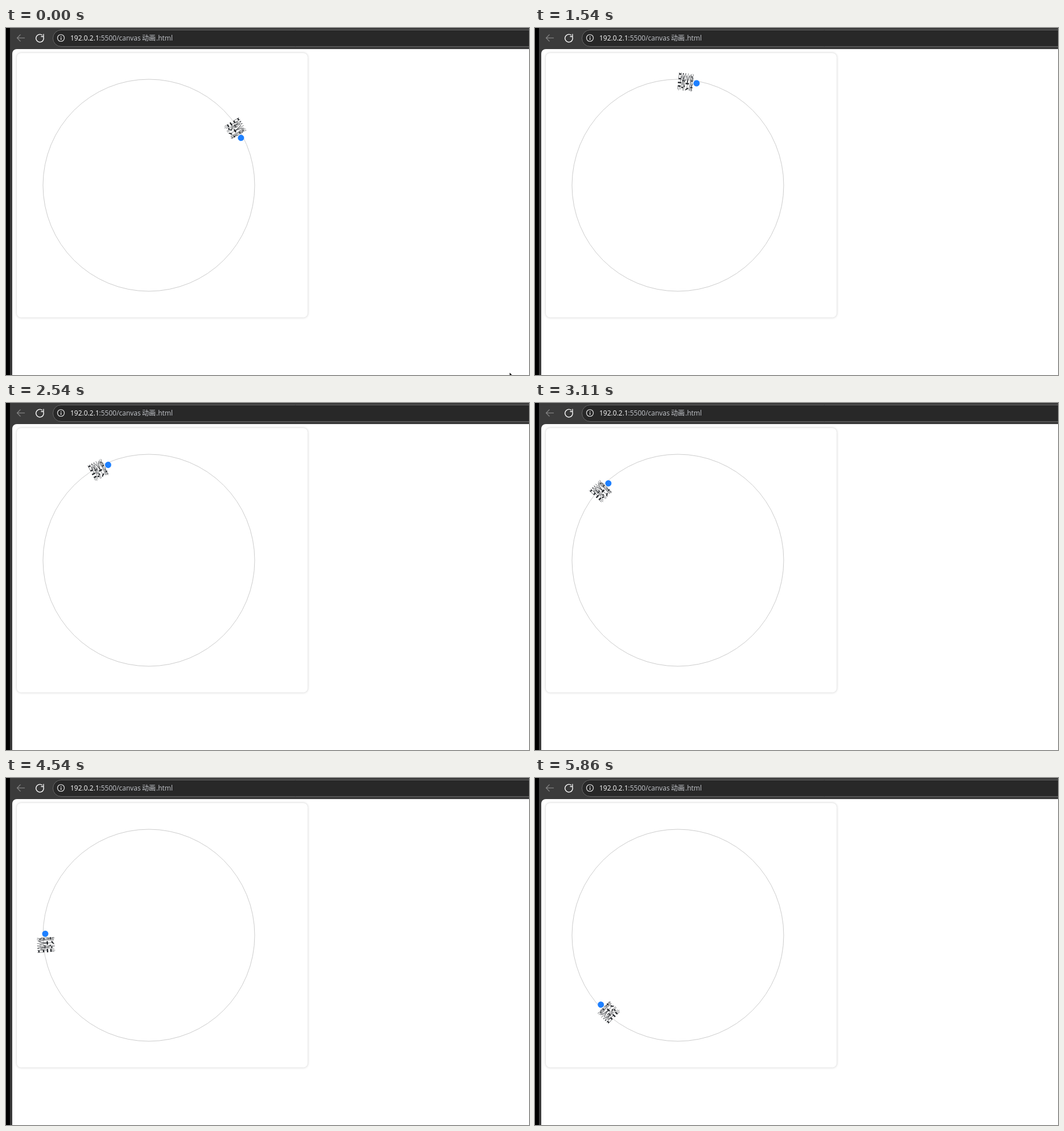
These frames come from a looping animation (919 by 609 pixels, 5.92 s). An HTML page with a canvas:

```html
<!DOCTYPE html>
<html lang="zh">
<head>
<meta charset="utf-8">
<title>Canvas orbit</title>
<style>
  html, body { margin: 0; width: 100%; height: 100%; overflow: hidden; background: #fff; }
  canvas { display: block; width: 919px; height: 609px; }
</style>
</head>
<body>
<canvas id="stage" width="919" height="609"></canvas>
<script>
const ctx = document.getElementById('stage').getContext('2d');
const LOOP = 5920;
const ORBIT = { x: 251, y: 276, r: 186 };
const UI_FONT = '12px "Open Sans", "Noto Sans", "Noto Sans CJK SC", sans-serif';
const LOGO_FONT = '500 34px "Noto Sans CJK SC", "Noto Sans CJK", sans-serif';
const LOGO_SQUASH = 0.2;

// Start of each stretch and the number of equal holds in it.
const BEATS = [
  [0, 1], [70, 8], [700, 2], [860, 1], [940, 5], [1320, 3], [1540, 1], [1630, 4],
  [1930, 8], [2540, 8], [3110, 1], [3160, 9], [3790, 9], [4400, 9], [5030, 9],
  [5650, 3], [5860, 1], [LOOP, 0]
];

function heldTime(t) {
  const i = BEATS.findIndex(([start]) => start > t) - 1;
  const [start, count] = BEATS[i];
  const step = (BEATS[i + 1][0] - start) / count;
  return start + Math.floor((t - start) / step) * step;
}

function roundRect(x, y, w, h, r) {
  ctx.beginPath();
  ctx.roundRect(x, y, w, h, r);
}

function circle(x, y, r) {
  ctx.beginPath();
  ctx.arc(x, y, r, 0, Math.PI * 2);
}

function line(points, color, width) {
  ctx.beginPath();
  points.forEach(([x, y]) => ctx.lineTo(x, y));
  ctx.strokeStyle = color;
  ctx.lineWidth = width;
  ctx.stroke();
}

function label(text, x, y, color) {
  ctx.fillStyle = color;
  ctx.fillText(text, x, y);
}

function drawToolbar() {
  ctx.fillStyle = '#3b3b3b';
  ctx.fillRect(0, 0, 919, 609);
  ctx.fillStyle = '#000';
  ctx.fillRect(0, 0, 7, 609);

  roundRect(82.5, 3.5, 860, 29, 14.5);
  ctx.fillStyle = '#282828';
  ctx.fill();
  ctx.strokeStyle = '#686868';
  ctx.lineWidth = 1;
  ctx.stroke();

  line([[33, 17.5], [19.5, 17.5]], '#858585', 1.2);
  line([[25.5, 11.5], [19.5, 17.5], [25.5, 23.5]], '#858585', 1.2);

  ctx.beginPath();
  ctx.arc(59.5, 18, 6.8, -0.35, Math.PI * 1.72);
  ctx.strokeStyle = '#fff';
  ctx.lineWidth = 1.4;
  ctx.stroke();
  line([[66, 10.5], [66, 15], [61.5, 15]], '#fff', 1.3);

  circle(96.5, 17.5, 6);
  ctx.strokeStyle = '#e4e4e4';
  ctx.lineWidth = 1.2;
  ctx.stroke();
  ctx.fillStyle = '#e4e4e4';
  ctx.fillRect(96, 14, 1.3, 1.4);
  ctx.fillRect(96, 16.5, 1.3, 4.5);

  ctx.font = UI_FONT;
  ctx.textAlign = 'left';
  ctx.textBaseline = 'alphabetic';
  label('192.0.2.1', 113, 22, '#fff');
  label(':5500/canvas', 163.5, 22, '#c4c7cc');
  label('动画', 239, 22, '#c4c7cc');
  label('.html', 264, 22, '#c4c7cc');
}

function drawPage() {
  roundRect(11, 37, 920, 600, [8, 0, 0, 0]);
  ctx.fillStyle = '#fff';
  ctx.fill();

  ctx.save();
  ctx.shadowColor = 'rgba(0,0,0,.14)';
  ctx.shadowBlur = 4;
  roundRect(18.5, 43.5, 512, 465, 8);
  ctx.fillStyle = '#fff';
  ctx.fill();
  ctx.restore();
  ctx.strokeStyle = '#e8e8e8';
  ctx.lineWidth = 1;
  ctx.stroke();

  circle(ORBIT.x, ORBIT.y, ORBIT.r);
  ctx.strokeStyle = '#ccc';
  ctx.stroke();
}

function drawLogo(t) {
  const deg = 31.6 + 0.0343 * t - 1.8e-7 * t * t;
  ctx.save();
  ctx.translate(ORBIT.x, ORBIT.y);
  ctx.rotate(-deg * Math.PI / 180);
  ctx.translate(ORBIT.r - 4.5, 0);
  ctx.rotate(-Math.PI / 2);

  circle(-14, 0, 5.5);
  ctx.fillStyle = '#1e80ff';
  ctx.fill();

  ctx.translate(-8, 0);
  ctx.scale(LOGO_SQUASH, 1);
  ctx.font = LOGO_FONT;
  ctx.textBaseline = 'middle';
  label('粼禾掬岩', 0, 0, '#25282c');
  ctx.restore();
}

function drawPointer() {
  ctx.beginPath();
  ctx.moveTo(885, 605);
  ctx.lineTo(889, 609);
  ctx.lineTo(885, 609);
  ctx.fillStyle = '#000';
  ctx.fill();
}

function frame() {
  const t = heldTime(performance.now() % LOOP);
  drawToolbar();
  drawPage();
  drawLogo(t);
  if (t < 70) drawPointer();
  requestAnimationFrame(frame);
}
frame();
</script>
</body>
</html>
```
